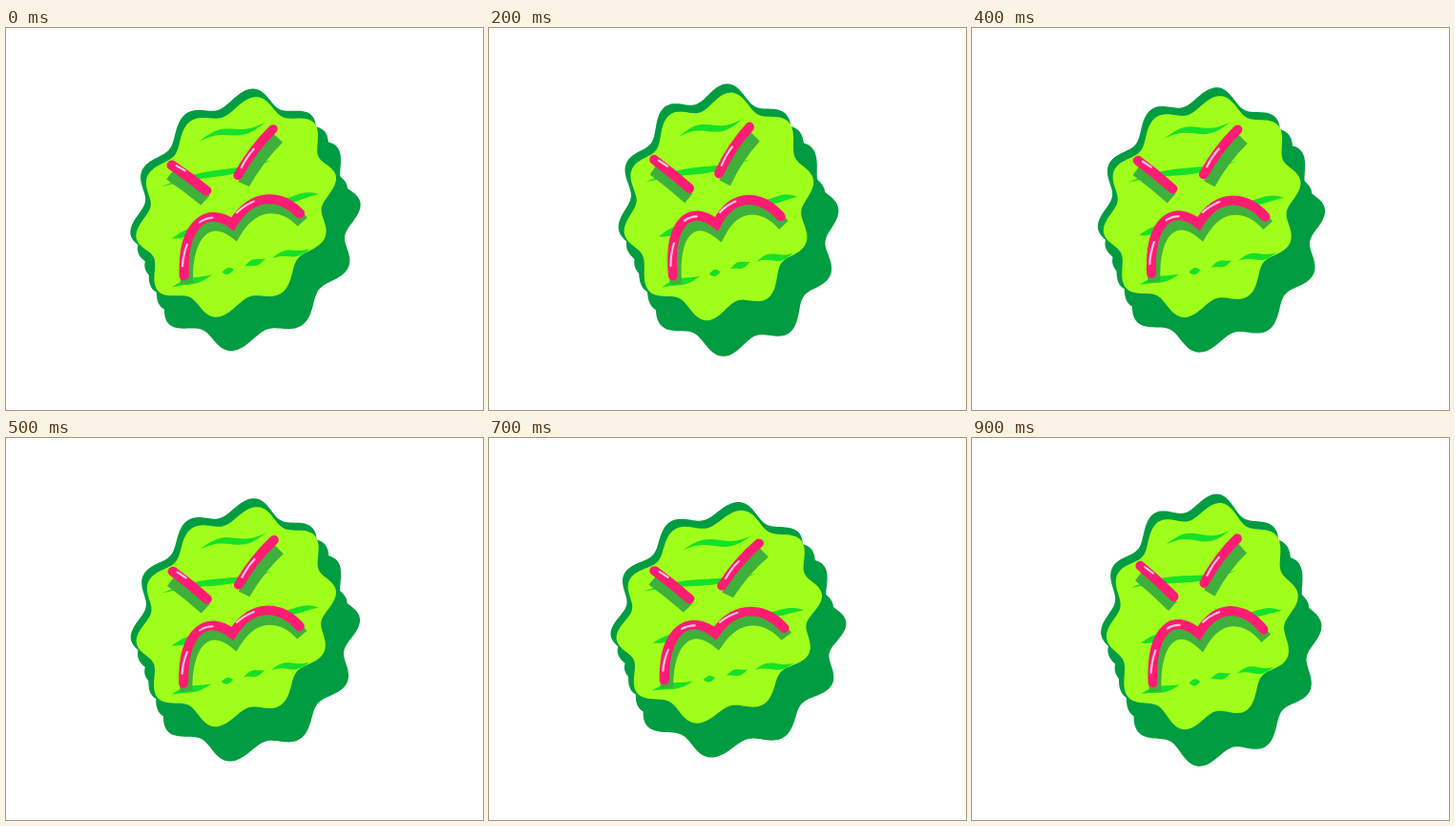
An HTML page with a canvas for the animation above (1 s loop, 500x400 px).

```html
<!DOCTYPE html>
<html>
<head>
<meta charset="utf-8">
<style>
html, body { margin: 0; width: 100%; height: 100%; overflow: hidden; background: #fff; }
canvas { display: block; }
</style>
</head>
<body>
<canvas id="stage" width="500" height="400"></canvas>
<script>
const ctx = document.getElementById('stage').getContext('2d');
const { sin, cos, PI } = Math;
const STEP = 100, CX = 246, CY = 195;
const RIM = '#009c41', BODY = '#a0ff1a', STRIPE = '#16e128',
      SHADE = '#3eb03c', PINK = '#ff1c73', SHINE = '#ffc4e0';

const mix = (a, b, k) => a + (b - a) * k;

// unit blob with ten uneven lobes, also longer along one diagonal
const blob = new Path2D();
for (let i = 0; i < 360; i++) {
  const p = i * PI / 180;
  const angle = p - .03 - .073 * cos(2 * p - PI / 3);
  const r = .945 - .055 * sin(2 * angle) + .065 * cos(10 * p + 820 * PI / 180);
  blob.lineTo(r * cos(angle), r * sin(angle));
}

// wavy lens from one end to the other
function stripe(x0, y0, x1, y1, wave) {
  const edge = (k, side) =>
    [mix(x0, x1, k), mix(y0, y1, k) - wave * sin(2 * PI * k) + side * 3.5 * sin(PI * k)];
  const path = new Path2D();
  for (let k = 0; k <= 1; k += .05) path.lineTo(...edge(k, -1));
  for (let k = 1; k >= 0; k -= .05) path.lineTo(...edge(k, 1));
  return path;
}
const stripes = [
  stripe(200, 115, 268, 98, 4),
  stripe(163, 161, 276, 139, 2),
  stripe(176, 217, 204, 207, 0),
  stripe(284, 183, 326, 178, -1),
  stripe(178, 269, 219, 258, 1),
  stripe(229, 256, 241, 254, 0),
  stripe(252, 251, 273, 244, 1),
  stripe(280, 244, 319, 236, 2)
];

// brows and mouth, each with the offset of its shadow
const face = [
  [new Path2D('M173 138Q192 152 210 168'), -1, 10],
  [new Path2D('M276 106Q256 126 242 153'), 6, 10],
  [new Path2D('M190 257C186 200 212 184 238 205C258 170 288 177 307 198'), 3, 9]
];
const shine = new Path2D('M178 139l9 6M245 145Q250 134 257 126M188 247Q188 236 192 224' +
  'M204 201Q210 197 217 197M242 193Q249 186 259 182');

// wobble keys: step, stretch, lean, tilt
const keys = [
  [0, .02, -.035, -.058],
  [2, -.021, .0255, -.014],
  [3, 0, 0, 0],
  [5, .015, -.048, -.01],
  [6, .011, -.018, .042],
  [7, .042, -.062, .02],
  [9, -.022, -.03, .04]
];
function pose(n) {
  const i = Math.max(1, keys.findIndex(key => key[0] >= n));
  const a = keys[i - 1], b = keys[i];
  return a.map((v, j) => mix(v, b[j], (n - a[0]) / (b[0] - a[0])));
}

function fillBlob(x, y, rx, ry, color) {
  ctx.save();
  ctx.translate(x, y);
  ctx.scale(rx, ry);
  ctx.fillStyle = color;
  ctx.fill(blob);
  ctx.restore();
}
function line(path, color, width, cap) {
  ctx.strokeStyle = color;
  ctx.lineWidth = width;
  ctx.lineCap = cap;
  ctx.stroke(path);
}

function draw(n) {
  const [, stretch, lean, tilt] = pose(n);
  ctx.resetTransform();
  ctx.fillStyle = '#fff';
  ctx.fillRect(0, 0, 500, 400);
  ctx.setTransform(1 + stretch, tilt, lean, 1 - stretch, CX, CY);
  ctx.translate(-CX, -CY);

  for (let k = 0; k <= 1; k += .5) {
    fillBlob(mix(237, 259, k), mix(182, 218, k), mix(103, 109, k), mix(119, 121, k), RIM);
  }
  fillBlob(241, 187, 101, 115, BODY);
  ctx.fillStyle = STRIPE;
  stripes.forEach(s => ctx.fill(s));

  for (const [path, dx, dy] of face) {
    ctx.translate(dx, dy);
    line(path, SHADE, 13, 'butt');
    ctx.translate(-dx, -dy);
  }
  face.forEach(([path]) => line(path, PINK, 10, 'round'));
  line(shine, SHINE, 2.2, 'round');
}

function tick() {
  draw(Math.floor(performance.now() / STEP) % 10);
  requestAnimationFrame(tick);
}
tick();
</script>
</body>
</html>
```
